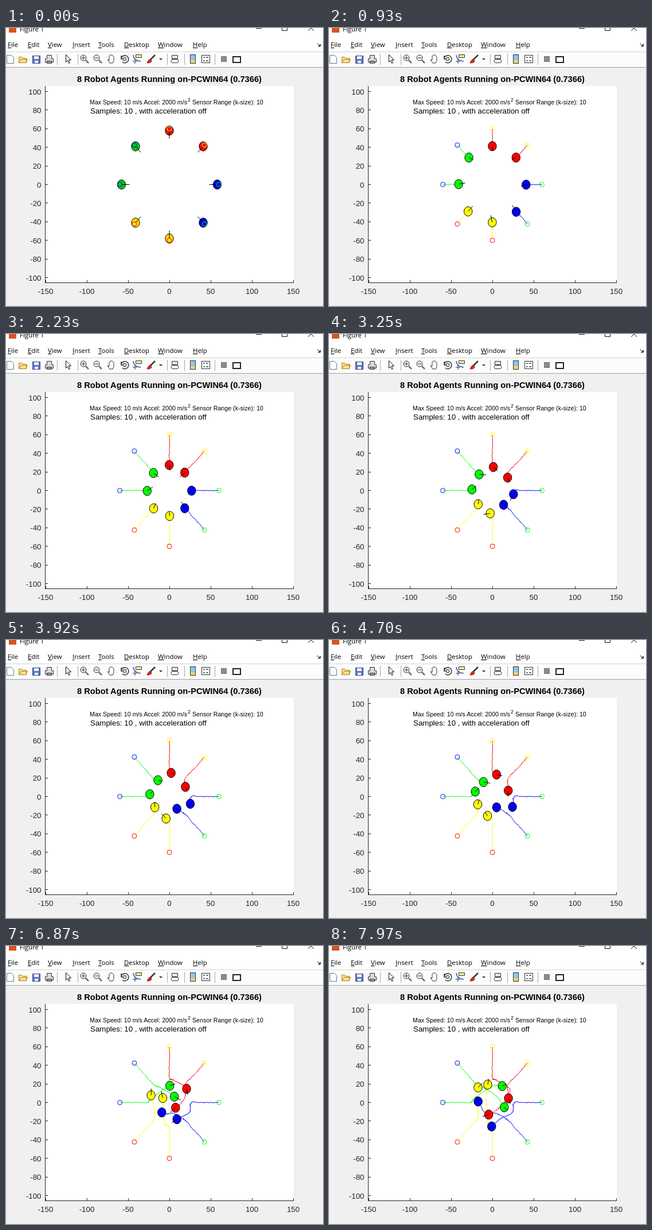
Recreate the animation shown at these times as an HTML page. Size 553 px wide and 484 px high, loop 8 s.

```html
<!DOCTYPE html>
<html lang="en">
<head>
<meta charset="utf-8">
<title>Robot agents</title>
<style>
  html, body { margin: 0; width: 100%; height: 100%; overflow: hidden; background: #f0f0f0; }
  svg { display: block; }
  text { font-family: "Liberation Sans", Arial, sans-serif; white-space: pre; }
  .ui text { font: 11.4px "Open Sans", sans-serif; }
  .tick { font-size: 13.33px; fill: #262626; }
  .crisp { shape-rendering: crispEdges; }
</style>
</head>
<body>
<svg width="553" height="484" viewBox="0 0 553 484">
  <rect width="553" height="484" fill="#f0f0f0"/>
  <rect width="553" height="41" fill="#fff"/>
  <rect y="41" width="553" height="27" fill="#fcfcfc"/>
  <path class="crisp" d="M0 41.5H553" stroke="#d4d4d4"/>
  <path class="crisp" d="M0 68.5H553" stroke="#a0a0a0"/>

  <g id="bar" class="ui">
    <rect x="5" y="-4" width="13" height="12" fill="#d9531e"/>
    <text x="24" y="6">Figure 1</text>
    <path d="M436 .5h10M481.500 0v4.500h9V0M527 5l5-5l5 5" fill="none" stroke="#111"/>
    <path d="M543 27l5 5v-4v4h-4" fill="none" stroke="#000"/>
  </g>

  <g id="tools" fill="none" stroke="#333">
    <path d="M1.500 47.500h8l4 4v10h-12z" fill="#fff" stroke="#68788c"/>
    <path d="M22.500 60.500v-10h5l2 2h6v8zl4-6h11l-3 6" fill="#ffe08a" stroke="#a98322"/>
    <path d="M46.500 48.500h13v13h-13z" fill="#5b78c0" stroke="#39497f"/>
    <path d="M49 49h8v5h-8zm1 8h6v4h-6z" fill="#f4f4fa" stroke="none"/>
    <path d="M71.500 53.500v-6h8v6h3v6h-14v-6zm0 4h8v4h-8z" fill="#d8dae0"/>
    <path d="M104.500 46.500v13l3-3l2 5l2-1l-2-5h4z" fill="#fff" stroke="#111"/>
    <path d="M181 61l-4-6l3 1v-7l2-2h3l3 3v7l-2 4z" fill="#fff"/>
    <path d="M201 48v6h5m-5-1a6.500 6.500 0 1 1 2 6" stroke-width="1.500"/>
    <circle cx="207" cy="54" r="3" fill="#b9d3ee"/>
    <path d="M222 47q1 10 13 11" stroke="#2460c0" stroke-width="1.500"/>
    <path d="M226.500 46.500h10v5h-10z" fill="#ffe790"/>
    <path d="M225 54v8m-4-4h8"/>
    <path d="M260 47l-8 8" stroke-width="2.500"/>
    <path d="M252 54q-3 0-6 7q8 0 8-4z" fill="#d32a20" stroke="#a01810"/>
    <path d="M267 53h6l-3 3z" fill="#333" stroke="none"/>
    <path d="M289.500 47.500h10v6h-10z" fill="#dce8f6"/>
    <rect x="288" y="54.500" width="13" height="6" rx="3"/>
    <rect x="321.500" y="46.500" width="9" height="15" fill="#8cc7ee"/>
    <path d="M322 56h8v5h-8z" fill="#f4d46a" stroke="none"/>
    <rect x="341.500" y="47.500" width="14" height="13" fill="#fff"/>
    <path d="M344 51h3m2 0h4M344 57h3m2 0h4" stroke="#678" stroke-width="2"/>
    <rect x="375.500" y="49.500" width="9" height="9" fill="#8b8b8b" stroke="#777"/>
    <path d="M396 50h13v10h-13z" fill="#fff" stroke="#222" stroke-width="2"/>
  </g>

  <rect x="69" y="101" width="433" height="343" fill="#fff"/>
  <g id="axes"><path id="axisLines" class="crisp" fill="none" stroke="#262626"/></g>
  <text x="285" y="94" text-anchor="middle" font-size="14.67" font-weight="bold">8 Robot Agents Running on-PCWIN64 (0.7366)</text>
  <g font-size="10.67">
    <text x="146" y="133">Max Speed: 10 m/s Accel: 2000 m/s</text>
    <text x="317" y="128" font-size="8.6">2</text>
    <text x="325" y="133">Sensor Range (k-size): 10</text>
  </g>
  <text x="147" y="149" font-size="13.33">Samples: 10 , with acceleration off</text>
  <g id="trails" fill="none"></g>
  <g id="bodies" stroke="#000"></g>
  <g id="homes" fill="none"></g>
</svg>
<script>
const $ = id => document.getElementById(id);
function add(parent, tag, attrs, text) {
  const el = document.createElementNS('http://www.w3.org/2000/svg', tag);
  for (const k in attrs) el.setAttribute(k, attrs[k]);
  if (text !== undefined) el.textContent = text;
  return parent.appendChild(el);
}
const px = x => 285 + 1.44 * x;
const py = y => 272.5 - 1.62 * y;

// Menu, toolbar separators and zoom icons
const menu = { File: 3, Edit: 38, View: 73, Insert: 116, Tools: 161, Desktop: 206, Window: 265, Help: 326 };
for (const name in menu) {
  const item = add($('bar'), 'text', { x: menu[name], y: 33 });
  add(item, 'tspan', { 'text-decoration': 'underline' }, name[0]);
  add(item, 'tspan', {}, name.slice(1));
}
for (const x of [89.5, 125.5, 281.5, 311.5, 364.5])
  add($('tools'), 'path', { d: `M${x} 45v19`, stroke: '#a8a8a8' });
for (const [x, sign] of [[135, 'h6m-3-3v6'], [158, 'h6']]) {
  add($('tools'), 'path', { d: `M${x + 4} 56l5 5`, stroke: '#8a6a3c', 'stroke-width': 2.5 });
  add($('tools'), 'circle', { cx: x, cy: 52, r: 5, fill: '#e4f1fb' });
  add($('tools'), 'path', { d: `M${x - 3} 52${sign}` });
}

// Axes
let lines = 'M68.5 101V443.5H502';
for (let v = -100; v <= 100; v += 20) {
  lines += `M69 ${Math.floor(py(v)) + .5}h4`;
  add($('axes'), 'text', { class: 'tick', x: 61.5, y: py(v) + 5, 'text-anchor': 'end' }, v);
}
for (let v = -150; v <= 150; v += 50) {
  lines += `M${Math.floor(px(v)) + .5} 443v-4`;
  add($('axes'), 'text', { class: 'tick', x: px(v), y: 463, 'text-anchor': 'middle' }, v);
}
$('axisLines').setAttribute('d', lines);

// Each robot first runs straight inwards, then turns through three points (plot units)
const keys = [0, 12, 29, 61, 89, 103];
const inward = [58, 41, 27];
const turns = [
  [[24, -11], [9, -18], [-1, -26]],
  [[19, 6], [8, -6], [-4, -13]],
  [[5, 24], [21, 15], [20, 5]],
  [[-11, 16], [6, 6], [14, -5]],
  [[-21, 5], [1, 18], [12, 18]],
  [[-18, -8], [-22, 8], [-17, 16]],
  [[-6, -21], [-8, 5], [-6, 19]],
  [[5, -12], [-9, -11], [-17, 1]]
];
// Running colour, colour before the start, marker colour
const blue = ['#00f', '#0000dc', '#0f0'], red = ['#f00', '#f01008', '#ff0'];
const green = ['#0f0', '#00c814', '#00f'], yellow = ['#ff0', '#ffdc00', '#f00'];
const paints = [blue, red, red, green, green, yellow, yellow, blue];
const STEP = 77.3, LOOP = 8000, LAST = 103;

function noise(a, b) {
  const s = Math.sin(a * 127.1 + b * 311.7) * 43758.5453;
  return s - Math.floor(s) - .5;
}
// Smooth curve through the route, one coordinate at a time
function along(route, step, c) {
  const end = keys.length - 1;
  let i = 0;
  while (i < end - 1 && step >= keys[i + 1]) i++;
  const span = keys[i + 1] - keys[i], u = (step - keys[i]) / span, v = 1 - u;
  const slope = j => {
    const a = Math.max(j - 1, 0), b = Math.min(j + 1, end);
    return (route[b][c] - route[a][c]) / (keys[b] - keys[a]) * span;
  };
  return route[i][c] * v * v * (1 + 2 * u) + route[i + 1][c] * u * u * (1 + 2 * v)
    + slope(i) * u * v * v - slope(i + 1) * u * u * v;
}

const robots = turns.map((points, k) => {
  const cos = Math.cos(k * Math.PI / 4), sin = Math.sin(k * Math.PI / 4), paint = paints[k];
  const at = r => [r * cos, r * sin];
  const route = [...inward.map(at), ...points].map(([x, y]) => [px(x), py(y)]);
  const home = [px(60 * cos), py(60 * sin)];
  const track = [];
  for (let n = 0; n <= LAST; n++) {
    const place = s => [along(route, s, 0), along(route, s, 1)];
    const [x, y] = place(n), [x0, y0] = place(n - .5), [x1, y1] = place(n + .5);
    const shake = n ? 1 : 0;
    const angle = Math.atan2(y1 - y0, x1 - x0) + shake * noise(n, k + 20);
    const reach = 14 - shake * (4 + 7 * noise(n, k + 40));
    track.push({
      x: x + shake * 1.6 * noise(n, k), y: y + shake * 1.6 * noise(n, k + 60),
      dx: reach * Math.cos(angle), dy: reach * Math.sin(angle)
    });
  }
  add($('homes'), 'circle', { cx: home[0], cy: home[1], r: 4, stroke: paint[2] });
  const body = add($('bodies'), 'g', {});
  return {
    paint, home, track, body,
    trail: add($('trails'), 'polyline', { stroke: paint[0] }),
    disc: add(body, 'ellipse', { rx: 7.2, ry: 8.1 }),
    nose: add(body, 'path', {})
  };
});

let shown = -1;
function draw() {
  const t = performance.now() % LOOP;
  const n = Math.min(LAST, Math.floor(t / STEP + .29));
  if (n !== shown) {
    shown = n;
    for (const r of robots) {
      const p = r.track[n];
      const points = r.track.slice(0, n + 1).map(q => `${q.x},${q.y}`);
      r.trail.setAttribute('points', [r.home.join(), ...points].join(' '));
      r.body.setAttribute('transform', `translate(${p.x} ${p.y})`);
      r.disc.setAttribute('fill', r.paint[n ? 0 : 1]);
      r.nose.setAttribute('d', `M0 0L${p.dx} ${p.dy}`);
    }
  }
  requestAnimationFrame(draw);
}
draw();
</script>
</body>
</html>
```
